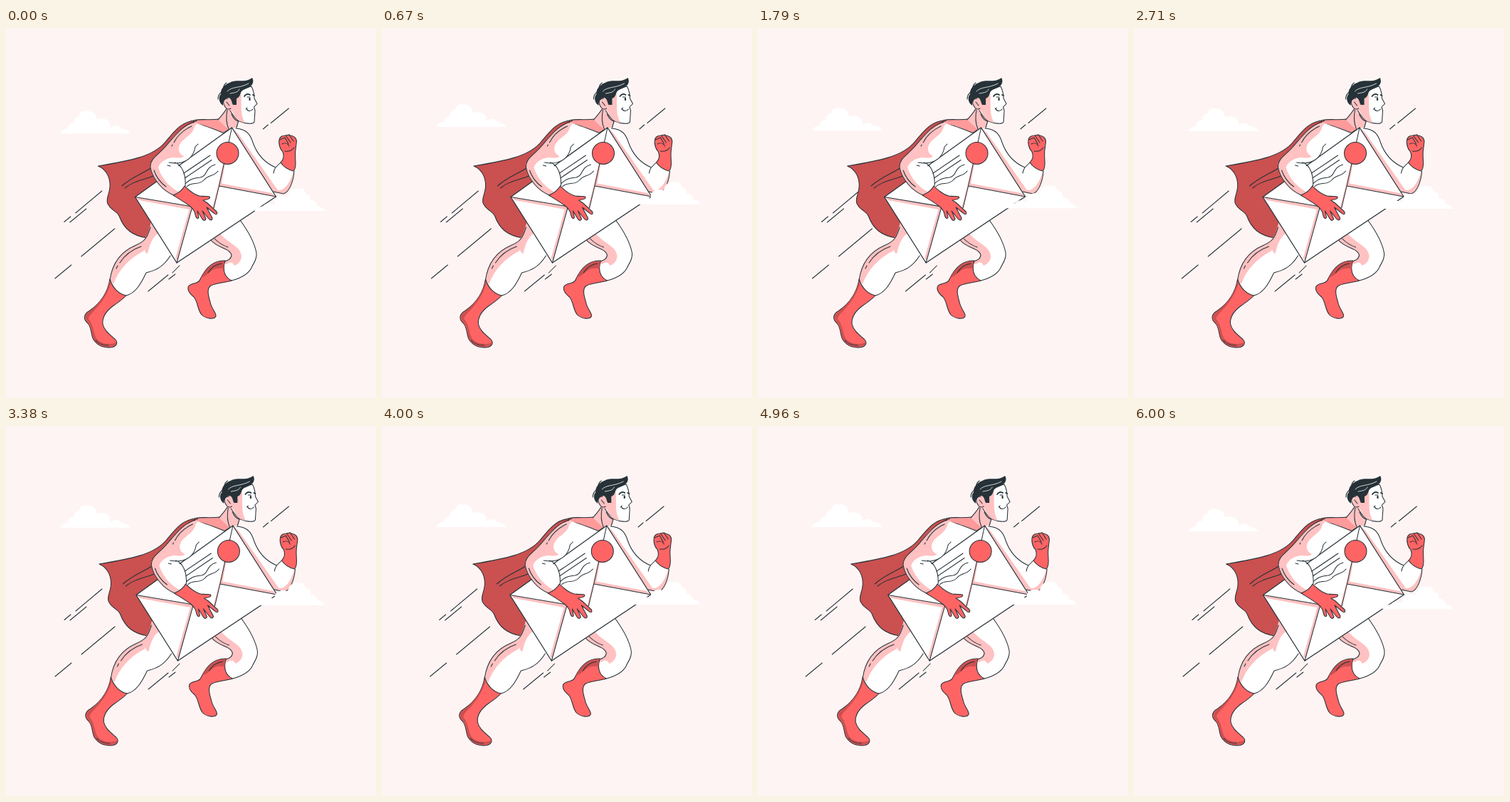
These frames come from a looping animation (520x520 px, 6.04 s). An HTML page:

```html
<!DOCTYPE html>
<html lang="en">
<head>
<meta charset="utf-8">
<title>Hero delivering a letter</title>
<style>
html, body { margin: 0; width: 100%; height: 100%; overflow: hidden; background: #fef4f3; }
svg { display: block; width: 100vw; height: 100vh; }
path { stroke-linejoin: round; stroke-linecap: round; }
.o { stroke: #263238; stroke-width: 1.05; }
.b { stroke-width: 1.25; }
.n { fill: none; }
.w { fill: #fff; }
.r { fill: #ff6464; }
.d { fill: #cb5050; }
.p { fill: #ffc1c1; }
.s { fill: #ff9a9a; }
.k { fill: #263238; }
</style>
</head>
<body>
<svg viewBox="0 0 520 520">
  <defs>
    <path id="cloud" class="w" d="M76 148.600C78 143 83 143 87 141C87 136 91 133 96 134C95 128 98 125 103 124C104 118 108 116.500 114 117C120 117 125 119 127 125C128 127 127 128 129 129C135 126 143 128 146 134C147 138 145 140 148 140C152 136 160 137 163 142C168 142 173 145 175 148.600Z"/>
  </defs>

  <path id="wind" class="o n" d="M82 272.500L91 265M90 273L113 254M98 260L135 229M69 352L92 333M106 321L153 282M200 370L228 347M229 353L238 346M234 344L244 334M361.500 142L368.500 136M372.500 133.500L397.500 113"/>
  <use class="cloud" href="#cloud"/>

  <g id="hero">
    <!-- cape -->
    <path class="d o" d="M268 129.500C248 131 239 142 225 159C208 181 172 187 129.500 194C142 199 147 212 146 224C145 235 140 240 143 247C148 257 155 256 159 264C166 283 178 292 198 295L245 240L270 140Z"/>
    <path class="o n" d="M163 222C177 209 190 206 205 196M167 225C179 215 192 214 207 208"/>

    <!-- front leg -->
    <path class="w" d="M287 297C298 311 316 309 317 320C315 327 309 327 305 329C304 341 308 351 317 355C332 351 341 345 345 337C347 331 353 327 352 316C349 300 340 285 329 270Z"/>
    <path class="p" d="M287 297C298 311 316 309 317 320C315 327 309 327 305 329L310 332C316 327 319 330 321 334C328 331 331 326 331 320C329 306 314 304 301 289Z"/>
    <path class="o n" d="M287 297C298 311 316 309 317 320C315 327 309 327 305 329M317 355C332 351 341 345 345 337C347 331 353 327 352 316C349 300 340 285 329 270M293 296C300 303 306 306 312 308"/>
    <path class="r o" d="M308 327C293 326 281 336 273 353C270 361 261 357 256.500 363C254 369 259 374 264 378C270 385 269 396 275 403C281 409 293 410 295 405C296 401 289 395 287 385C284 375 282 366 288 362C297 358 308 358 317 355C307 350 304 340 308 327Z"/>
    <path class="d" d="M307 328C294 327 282 336 274 351C282 349 286 342 291 340C296 337 301 338 306 338Z"/>
    <path class="o n" d="M284 344C289 336 296 332 303 331"/>

    <!-- back leg -->
    <path class="w" d="M205 270C198 296 195 300 181 306C158 316 149 334 146 354C150 366 159 374 169 376C182 373 190 359 197 344C207 341 219 339 231 320L240 300Z"/>
    <path class="p" d="M205 270C198 296 195 300 181 306C158 316 149 334 146 354L151 360C158 341 171 325 194 313C194 307 195 317 199 317C202 304 206 293 215 288Z"/>
    <path class="o n" d="M203 280C198 296 195 300 181 306C158 316 149 334 146 354M169 376C182 373 190 359 197 344C207 341 219 339 231 320M160 330C167 319 178 311 190 307M155 338L157 334"/>
    <path class="r o" d="M146 353C143 372 132 387 118 397C109 402 108 409 115 415C121 422 119 431 123 438C130 448 138 449 147 449C156 448 158 442 153 437C145 430 138 425 136 416C135 405 142 397 150 391C159 385 164 381 169 376C159 374 150 366 146 353Z"/>
    <path class="d" d="M146 355C143 372 132 387 118 398C110 403 110 409 116 414C122 422 120 431 124 438C131 447 143 449 150 447C154 446 156 444 155 442C147 446 132 444 127 436C123 429 123 417 116 409C116 401 137 391 147 360Z"/>
    <path class="o n" d="M126 439C131 445 137 446 144 446"/>

    <!-- far arm -->
    <path class="w" d="M323 141C339 142 344 151 347 161C353 178 365 190 379 196L386 189L405 201C404 216 398 231 390 233L376 231L317 150Z"/>
    <path class="p" d="M320 142L326 148L382 228C393 229 400 215 404 202L405 201C404 216 398 231 390 233L376 231L317 150Z"/>
    <path class="o n" d="M323 141C339 142 344 151 347 161C353 178 365 190 379 196L386 189M405 201C404 216 398 231 390 233L376 230M379 196C377 199 376 201 376 204"/>
    <path class="r o" d="M386 189C391 184 391 179 389 174C385 170 383 163 384 157C385 153 389 151 393 151L398 150C400 152 403 151 405 153C408 155 409 158 408 163L407 171C406 178 407 184 407 190C407 195 406 199 404 201C396 199 390 195 386 189Z"/>
    <path class="o n" d="M385 157L392 154L397 163M393 151L400 161M398 150L404 159M388 163C392 161 396 162 398 166M392 173C397 174 402 172 405 168"/>

    <!-- torso, collar and neck -->
    <path class="w" d="M270 131L300 137L318 142L260 210L210 210L228 170Z"/>
    <path class="s o" d="M264 130C275 127 286 130 299 128L317 140L306 147.500C292 142 278 136 264 134Z"/>
    <path class="p" d="M312 108C308 117 304 123 298 129L313 143L325 139L327 129L329 106Z"/>
    <path class="o n" d="M312 110C308 118 303 123 298 129M311 115C309 125 310 135 313 142M327 130L324 140M317 121C319 126 321 129 326 131"/>

    <!-- head -->
    <path class="w o" d="M320 88L345 82C348 88 349 94 349 99L353 106.500L348.500 111L350 116L349 132C347 136 335 134 328 131C321 128 316 117 312 111Z"/>
    <path class="p" d="M312 98L324 98L330 92C332 104 328 121 336 133C327 132 322 127 318 117L311 114C305 112 305 101 312 98Z"/>
    <path class="o n" d="M312 99C307 98 304 104 307 109C309 114 313 115 316 113M310 104L314 109"/>
    <path class="k" d="M305 109C299 105 298 97 302 93C301 87 306 80 314 77C323 71 336 78 346 70C349 75 347 80 342 83C338 86 332 86 330 91C329 95 327 98 324 99L324 108L319 108C317 104 317 99 313 98C308 98 305 102 305 109Z"/>
    <path class="o n" d="M305 88C305 83 307 79 310 77M298 100C298 95 300 92 303 90"/>
    <path class="n" stroke="#fff" stroke-width=".8" d="M311 89C317 82 328 85 341 78M315 92C320 91 326 91 328 86"/>
    <path class="n" stroke="#263238" stroke-width="1.700" d="M335 96C337 93 340 92 343 94M347 94L349 95"/>
    <ellipse class="k" cx="342.500" cy="100" rx="1.200" ry="2.200"/>
    <path class="o n" d="M338 113C339 117 344 118 347 114M337 114L339 112M339 97L343 97"/>

    <!-- envelope -->
    <path class="w o b" d="M181.500 237.500L317.500 140L379.500 237L240 330Z"/>
    <path class="p" d="M183 238L262 251L241 327L238 324L257.500 255L187 242Z"/>
    <path class="p" d="M316.500 144L298 222L290 253L293 253L300 222L379 237L374 232L303 218.500Z"/>
    <path class="o n" d="M181.500 237.500L262 251L240 330M317.500 140L299.500 222L379.500 237M299.500 222L292 253"/>
    <path class="o n" d="M247 206L287 179M249 212.500L289 185.500M250 221C258 212 264 211 273 210C284 208 279 196 294 192M254 223C262 215 270 222 278 214C285 205 291 210 298 201"/>
    <circle class="r o" cx="311.500" cy="176" r="15.500"/>

    <!-- near arm -->
    <path class="w" d="M266 133C246 138 237 151 223 168C213 179 202 184 203 196C206 212 220 229 236 235L252 222C253 207 247 194 236 190L250 188C260 184 265 176 266 166L292 143Z"/>
    <path class="p" d="M270 133C246 137 237 151 223 168C213 179 202 184 203 196C206 212 220 229 236 235L242 230C227 222 217 207 214 196C217 187 228 182 236 182C243 183 248 183 250 180C243 177 240 169 246 161C253 152 263 150 265 138Z"/>
    <path class="o n" d="M268 130.500C247 137 238 151 223 168C213 179 202 184 203 196C206 212 220 229 236 235M252 222C253 207 248 192 237 189M229 189L237 190C255 190 264 180 266 167L270 163M227 193L231 194M236 161C241 151 250 143 261 138M233 166L234 164M208 200C211 209 218 218 225 223"/>
    <path class="r o" d="M235 235C242 232 248 228 251 222C258 229 264 234 272 236C277 237 283 236 286 237C288 239 285 241 277 242L283 246L296 258C298 262 295 263 292 260L282 252L290 267C290 271 287 271 284 267L276 257L281 268C280 272 277 271 275 267L269 257L271 266C270 269 267 268 266 262C265 253 256 248 235 235Z"/>
  </g>

  <use class="cloud" href="#cloud" data-flip="1"/>
</svg>

<script>
const hero = document.getElementById('hero');
const wind = document.getElementById('wind');
const clouds = document.querySelectorAll('.cloud');
const LOOP = 6040, FPS = 24, SCALE = 1.04, LEAD = 0.025;
const SHAKE = [0, -1, 2, -4, 4, -4, 4, -4, 2, -1, 0];

// Linear ten-part shake; phase runs from 0 to 1.
function shake(phase) {
  const x = phase % 1 * 10, i = Math.floor(x);
  return (SHAKE[i] + (SHAKE[i + 1] - SHAKE[i]) * (x - i)) * SCALE;
}

function draw(now) {
  const frame = Math.floor((now % LOOP + 5) * FPS / 1000);
  const t = frame / FPS + LEAD;
  hero.setAttribute('transform', `translate(${shake(t / 6)})`);
  wind.setAttribute('transform', `translate(${2 * shake(t / 3)})`);

  const lift = 10 * SCALE * (1 - Math.abs(1 - t / 1.5 % 1 * 2));
  for (const cloud of clouds) {
    cloud.setAttribute('transform', cloud.dataset.flip
      ? `translate(524 ${109 - lift}) scale(-1 1)`
      : `translate(0 ${-lift})`);
  }
}

const start = performance.now();
function tick() {
  draw(performance.now() - start);
  requestAnimationFrame(tick);
}
tick();
</script>
</body>
</html>
```
